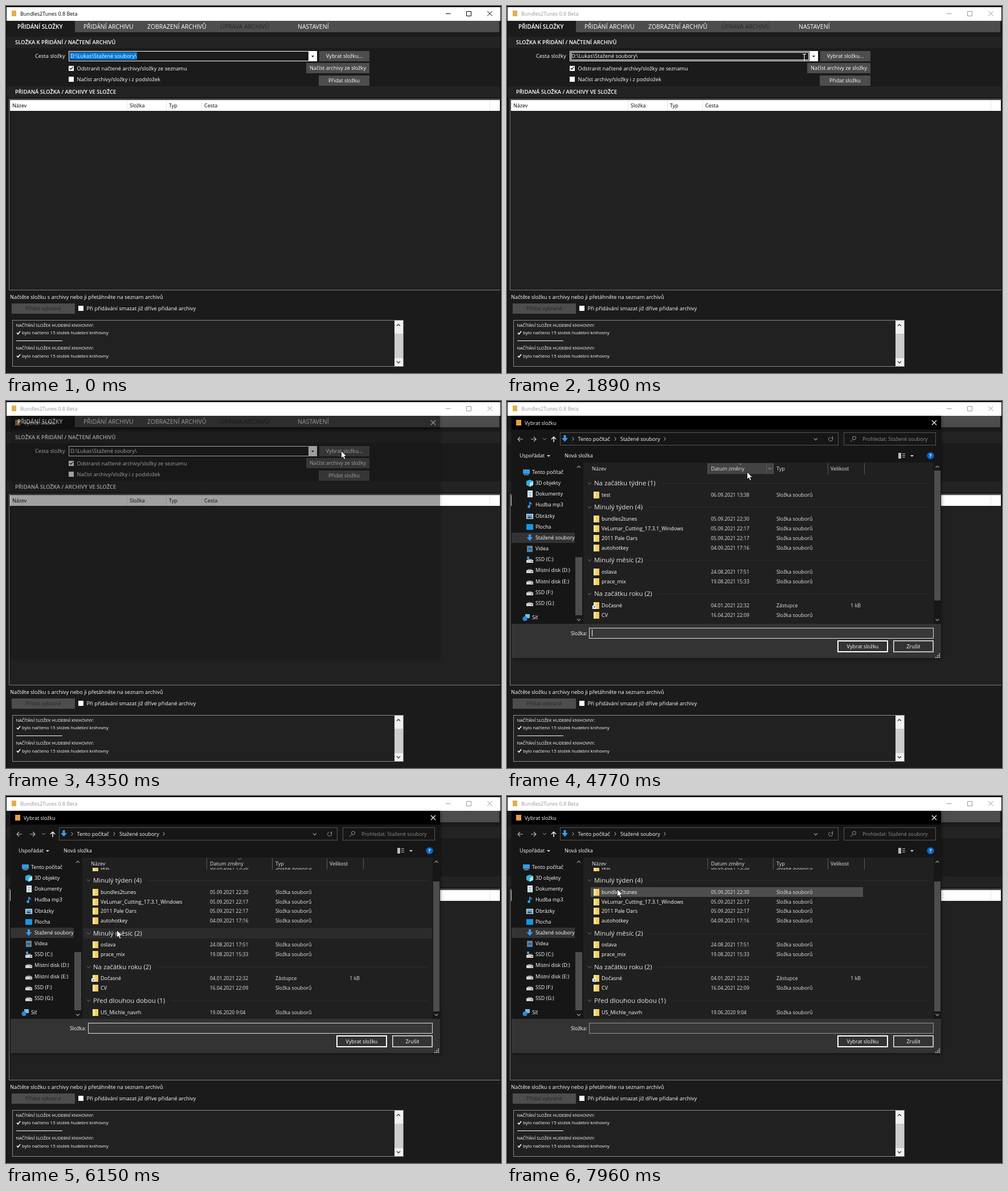
An HTML page for the animation above (8000 ms loop, 869 by 644 pixels).

```html
<!DOCTYPE html>
<html lang="cs">
<head>
<meta charset="utf-8">
<title>Bundles2Tunes</title>
<style>
html, body { margin: 0; width: 100%; height: 100%; overflow: hidden; background: #1b1b1b; }
svg { display: block; width: 869px; height: 644px; }
text { font-family: "Open Sans", "Noto Sans", sans-serif; white-space: pre; }
rect, line { shape-rendering: crispEdges; }
</style>
</head>
<body>
<svg id="stage" viewBox="0 0 869 644" xmlns="http://www.w3.org/2000/svg"></svg>
<script>
const NS = 'http://www.w3.org/2000/svg';
const LOOP = 8000, SCROLL = 38.5;
const stage = document.getElementById('stage');

function el(parent, tag, attrs) {
  const node = document.createElementNS(NS, tag);
  for (const k in attrs) node.setAttribute(k, attrs[k]);
  parent.appendChild(node);
  return node;
}
const group = (parent, attrs = {}) => el(parent, 'g', attrs);
// Boxes and frames are given by their edges.
const box = (p, x0, y0, x1, y1, fill) =>
  el(p, 'rect', { x: x0, y: y0, width: x1 - x0, height: y1 - y0, fill });
const frame = (p, x0, y0, x1, y1, stroke, fill = 'none') =>
  el(p, 'rect', { x: x0 + .5, y: y0 + .5, width: x1 - x0 - 1, height: y1 - y0 - 1, stroke, fill });
const path = (p, d, stroke, width = 1, fill = 'none') =>
  el(p, 'path', { d, stroke, 'stroke-width': width, fill });
// Text is placed by the middle of its capitals.
function label(p, str, x, y, size = 9, fill = '#fff', extra = {}) {
  const node = el(p, 'text', { x, y: y + size * .36, 'font-size': size, fill, ...extra });
  node.textContent = str;
  return node;
}
const chevron = (p, x, y, dx, dy, stroke, width = 1) =>
  path(p, dx ? `M${x - dx},${y - 3}L${x + dx},${y}L${x - dx},${y + 3}`
             : `M${x - 3},${y - dy}L${x},${y + dy}L${x + 3},${y - dy}`, stroke, width);
const triangle = (p, x, y, fill, r = 3) =>
  path(p, `M${x - r},${y - r / 2}h${2 * r}l${-r},${r}z`, 'none', 0, fill);
const show = (node, on) => node.setAttribute('display', on ? 'inline' : 'none');

/* ---------- main window ---------- */
const main = group(stage);
box(main, 0, 0, 869, 644, '#1b1b1b');
box(main, 0, 0, 869, 2, '#080808');
box(main, 0, 0, 1, 644, '#080808');
box(main, 868, 0, 869, 644, '#080808');
box(main, 1, 2, 868, 26, '#fff');
box(main, 10, 8, 18, 18, '#e2b04a');
const title = label(main, 'Bundles2Tunes 0.8 Beta', 25, 13.5, 9, '#000');
const controls = path(main, 'M772,13.5h8.5M808.5,9.5h8v8h-8zM845,9l8.5,8.5M853.5,9l-8.5,8.5', '#000');

box(main, 121, 26, 866, 46, '#4d4d4d');
label(main, 'PŘIDÁNÍ SLOŽKY', 20, 36.5, 10, '#fff', { 'font-weight': 600 });
[['PŘIDÁNÍ ARCHIVU', 136], ['ZOBRAZENÍ ARCHIVŮ', 248], ['ÚPRAVA ARCHIVŮ', 376, '#292929'], ['NASTAVENÍ', 512]]
  .forEach(([s, x, c]) => label(main, s, x, 36.5, 10.5, c || '#fff'));

function section(str, y0, y1) {
  box(main, 1, y0, 868, y1, '#232323');
  label(main, str, 16, (y0 + y1) / 2, 9.45, '#fff', { 'font-weight': 600 });
}
section('SLOŽKA K PŘIDÁNÍ / NAČTENÍ ARCHIVŮ', 54, 74);
section('PŘIDANÁ SLOŽKA / ARCHIVY VE SLOŽCE', 141, 160);

label(main, 'Cesta složky', 51, 88, 9.3);
frame(main, 110, 79, 546, 97, '#fff', '#1b1b1b');
box(main, 531, 79, 546, 97, '#fff');
triangle(main, 538.5, 88.5, '#000', 2.5);
const selection = box(main, 112, 81, 230, 94, '#0078d7');
const comboFocus = frame(main, 112, 81, 530, 95, '#fff');
label(main, 'D:\\Lukas\\Stažené soubory\\', 113, 87.5, 9.3);

function checkbox(str, x, y, on) {
  box(main, x, y - 5, x + 9, y + 4, '#fff');
  if (on) path(main, `M${x + 1.7},${y - .6}l2,2.3l3.8,-4.4`, '#000', 1.2);
  label(main, str, x + 14.5, y, 9.25);
}
checkbox('Odstranit načtené archivy/složky ze seznamu', 110, 109.5, true);
checkbox('Načíst archivy/složky i z podsložek', 110, 128.5);
checkbox('Při přidávání smazat již dříve přidané archivy', 127, 530.5);

const buttons = [
  ['Vybrat složku...', 550, 79, 638, 97],
  ['Načíst archivy ze složky', 527, 100, 638, 118],
  ['Přidat složku', 549, 122, 638, 140],
  ['Přidat vybrané', 10, 522, 121, 540, '#252525']
].map(([s, x0, y0, x1, y1, c]) => {
  const node = box(main, x0, y0, x1, y1, '#4d4d4d');
  label(main, s, (x0 + x1) / 2, (y0 + y1) / 2, 9.2, c || '#fff', { 'text-anchor': 'middle' });
  return { node, x0, y0, x1, y1, off: !!c };
});

frame(main, 5, 163, 868, 499, '#7c7c7c', '#212121');
box(main, 867, 164, 868, 498, '#212121');
box(main, 7, 165, 867, 184, '#fff');
[212, 281, 343, 849].forEach(x => box(main, x, 165, x + 1, 184, '#e3e3e3'));
[['Název', 11], ['Složka', 217], ['Typ', 286], ['Cesta', 348]]
  .forEach(([s, x]) => label(main, s, x, 174.5, 9, '#000'));
label(main, 'Načtěte složku s archivy nebo ji přetáhněte na seznam archivů', 7, 510.5, 9.3);

frame(main, 11, 551, 698, 633, '#8a8a8a', '#212121');
[560, 600.5].forEach(y => {
  label(main, 'NAČÍTÁNÍ SLOŽEK HUDEBNÍ KNIHOVNY:', 17.5, y, 7.4);
  path(main, `M19,${y + 13.5}l2,2.3l4,-5`, '#fff', 1.6);
  label(main, 'bylo načteno 15 složek hudební knihovny', 28, y + 13.5, 7.95);
});
box(main, 18, 587, 99, 588, '#fff');
box(main, 682, 552, 697, 632, '#f0f0f0');
box(main, 682, 575, 697, 618, '#cdcdcd');
chevron(main, 689, 560, 0, -1.6, '#444', 1.4);
chevron(main, 689, 625, 0, 1.6, '#444', 1.4);

/* ---------- folder dialog ---------- */
const defs = el(stage, 'defs', {});
const shadow = el(defs, 'filter', { id: 'shadow', x: '-5%', y: '-5%', width: '110%', height: '110%' });
el(shadow, 'feDropShadow', { dx: 1, dy: 2, stdDeviation: 3, 'flood-color': '#000', 'flood-opacity': .4 });
box(el(defs, 'clipPath', { id: 'listClip' }), 134, 126, 749, 390, '#fff');

const dialog = group(stage);
box(dialog, 8, 26, 762, 451, '#191919').setAttribute('filter', 'url(#shadow)');
box(dialog, 8, 26, 762, 50, '#000');
box(dialog, 16, 33, 25, 43, '#e2a04a');
label(dialog, 'Vybrat složku', 31, 38.5);
path(dialog, 'M746,34l8,8M754,34l-8,8', '#fff', 1.1);

const content = group(dialog);
const GREY = '#9a9a9a';
path(content, 'M28,67h-9m4,-4l-4,4l4,4', '#b5b5b5', 1.2);
path(content, 'M42,67h9m-4,-4l4,4l-4,4', '#b5b5b5', 1.2);
chevron(content, 66, 66.5, 0, 1.3, GREY);
path(content, 'M82,72v-9m-4,4l4,-4l4,4', '#fff', 1.4);
frame(content, 93, 55, 582, 78, '#555');
frame(content, 591, 55, 753, 78, '#555');
const downArrow = (x, y) => path(content, `M${x - 2},${y - 6}h4v5h3.5l-5.5,6.5l-5.5,-6.5h3.5z`, 'none', 0, '#3b9ae8');
downArrow(101.5, 66);
[116, 190, 277].forEach(x => chevron(content, x, 66.5, 1.3, 0, '#c8c8c8'));
label(content, 'Tento počítač', 124.5, 66.5, 9.1);
label(content, 'Stažené soubory', 199, 66.5, 9);
chevron(content, 542, 67, 0, 1.6, GREY, 1.2);
path(content, 'M571,64.5a3.6,3.6 0 1 1 -4,-1.2M571.5,62v3h-3', GREY);
path(content, 'M607,67.5l-4,4M606.5,65a3,3 0 1 1 6,0a3,3 0 1 1 -6,0', GREY);
label(content, 'Prohledat: Stažené soubory', 624, 66.5, 8.95, '#8c8c8c');

label(content, 'Uspořádat', 22, 96);
triangle(content, 73, 96.5, '#ddd');
label(content, 'Nová složka', 101, 96);
[91.5, 94.5, 97.5].forEach(y => box(content, 694, y, 699, y + 1, '#bbb'));
box(content, 687, 91, 692, 101, '#bbb');
triangle(content, 711, 96.5, '#ddd');
el(content, 'circle', { cx: 743.5, cy: 96, r: 6.2, fill: '#0b63c5' });
label(content, '?', 743.5, 96, 9, '#fff', { 'text-anchor': 'middle', 'font-weight': 700 });

/* navigation pane */
box(content, 8, 231, 119, 249, '#333');
const BLUE = '#2f9be6';
const icons = {
  pc: (x, y) => { box(content, x - 6, y - 5, x + 6, y + 3, BLUE); box(content, x - 4, y + 4, x + 4, y + 5, '#ccc'); },
  cube: (x, y) => { path(content, `M${x},${y - 6}l6,2.5v7l-6,3l-6,-3v-7z`, 'none', 0, '#35b0df');
                    path(content, `M${x},${y}l6,-3.5v7l-6,3z`, 'none', 0, '#aee3f5'); },
  doc: (x, y) => { box(content, x - 4, y - 6, x + 5, y + 6, '#eee');
                   [-3, 0, 3].forEach(d => box(content, x - 2, y + d, x + 3, y + d + 1, BLUE)); },
  note: (x, y) => { path(content, `M${x},${y + 3}v-8q1,3 4,4`, BLUE, 1.7);
                    el(content, 'circle', { cx: x - 1.5, cy: y + 3.5, r: 2.4, fill: BLUE }); },
  image: (x, y) => { box(content, x - 6, y - 4, x + 6, y + 5, '#e8eef2'); box(content, x - 5, y - 3, x + 5, y + 4, '#5aaad8');
                     path(content, `M${x - 5},${y + 4}l4,-4l6,4z`, 'none', 0, '#35546a'); },
  desk: (x, y) => box(content, x - 6, y - 5, x + 6, y + 5, '#1596e8'),
  down: (x, y) => downArrow(x, y),
  film: (x, y) => { box(content, x - 5, y - 5, x + 5, y + 6, '#777'); box(content, x - 3, y - 5, x + 3, y + 6, '#3f86c0');
                    box(content, x - 3, y, x + 3, y + 1, '#222'); },
  disk: (x, y) => { path(content, `M${x - 5},${y}l2,-2h6l2,2z`, 'none', 0, '#888');
                    el(content, 'rect', { x: x - 6, y, width: 12, height: 5, rx: 1, fill: '#d5d5d5' });
                    box(content, x + 2, y + 2, x + 5, y + 3, '#555'); },
  sys: (x, y) => { icons.disk(x, y + 1); box(content, x - 5, y - 5, x - 1, y - 1, BLUE); },
  net: (x, y) => { box(content, x - 2, y - 6, x + 6, y + 1, '#6cc0f0');
                   el(content, 'circle', { cx: x - 2, cy: y + 2, r: 4, fill: '#3a86cf' }); }
};
[['Tento počítač', 'pc', 125], ['3D objekty', 'cube', 144], ['Dokumenty', 'doc', 163], ['Hudba mp3', 'note', 182],
 ['Obrázky', 'image', 201.5], ['Plocha', 'desk', 220.5], ['Stažené soubory', 'down', 240], ['Videa', 'film', 259],
 ['SSD (C:)', 'sys', 278], ['Místní disk (D:)', 'disk', 297], ['Místní disk (E:)', 'disk', 316.5],
 ['SSD (F:)', 'disk', 335.5], ['SSD (G:)', 'disk', 354.5], ['Síť', 'net', 380]]
  .forEach(([s, icon, y]) => {
    const root = icon === 'pc' || icon === 'net';
    icons[icon](root ? 33.5 : 40, Math.round(y));
    label(content, s, root ? 44 : 50, y, 8.9);
  });

/* file list */
box(content, 134, 108, 749, 391, '#202020');
[[120, 132], [749, 762]].forEach(([a, b]) => {
  box(content, a, 108, b, 391, '#171717');
  chevron(content, (a + b) / 2, 115.5, 0, -1.5, GREY, 1.2);
  chevron(content, (a + b) / 2, 384, 0, 1.5, GREY, 1.2);
});
box(content, 120, 274, 132, 376, '#4d4d4d');
const thumb = box(content, 750, 122, 761, 350, '#4d4d4d');

const list = group(group(content, { 'clip-path': 'url(#listClip)' }));
const rows = [];
function heading(str, y, lineX) {
  rows.push({ y, half: 9, x0: 136, x1: 748, node: box(list, 136, y - 9, 748, y + 9, '#2b2b2b') });
  chevron(list, 145, y + .5, 0, 1.7, '#777');
  label(list, str, 153, y, 11.4, '#e8e8e8');
  box(list, lineX, y, 741, y + 1, '#2c2c2c');
}
function row(str, y, date, size) {
  rows.push({ y, half: 8.5, x0: 147, x1: 625, node: box(list, 147, y - 8.5, 625, y + 8.5, '#4d4d4d') });
  box(list, 152, y - 6, 162, y + 6, '#f2cf62');
  box(list, 152, y - 6, 156, y + 6, '#ffe392');
  if (size) {
    box(list, 150, y, 156, y + 6, '#fff');
    path(list, `M151.5,${y + 5}l3,-3m-2,0h2v2`, '#1b6fc0');
    label(list, size, 621, y, 8.8, '#e4e4e4', { 'text-anchor': 'end' });
  }
  label(list, str, 166, y);
  label(list, date, 358, y, 8.5, '#e4e4e4');
  label(list, size ? 'Zástupce' : 'Složka souborů', 473, y, 8.9, '#e4e4e4');
}
heading('Na začátku týdne (1)', 144, 272);
row('test', 164.5, '06.09.2021 13:38');
heading('Minulý týden (4)', 186, 249);
row('bundles2tunes', 207, '05.09.2021 22:30');
row('VeLumar_Cutting_17.3.1_Windows', 224, '05.09.2021 22:17');
row('2011 Pale Oars', 240.5, '05.09.2021 22:17');
row('autohotkey', 257.5, '04.09.2021 17:16');
heading('Minulý měsíc (2)', 279, 249);
row('oslava', 299.5, '24.08.2021 17:51');
row('prace_mix', 316.5, '19.08.2021 15:33');
heading('Na začátku roku (2)', 338, 265);
row('Dočasné', 358.5, '04.01.2021 22:32', '1 kB');
row('CV', 375.5, '16.04.2021 22:09');
heading('Před dlouhou dobou (1)', 397, 290);
row('US_Michle_navrh', 418, '19.06.2020 9:04');

const dateHover = group(content);
box(dateHover, 352, 109, 468, 128, '#434343');
box(dateHover, 455, 109, 456, 128, '#5a5a5a');
chevron(dateHover, 461.5, 118.5, 0, 1.3, '#bbb');
[352, 467, 563, 627].forEach(x => box(content, x, 109, x + 1, 129, '#5c5c5c'));
chevron(content, 410, 110.5, 0, 1.2, '#888');
[['Název', 149], ['Datum změny', 358], ['Typ', 473], ['Velikost', 568]]
  .forEach(([s, x]) => label(content, s, x, 119, 9, '#e4e4e4'));

/* bottom panel */
box(content, 8, 391, 762, 451, '#333');
label(content, 'Složka:', 112, 407.5, 8.9);
const input = frame(content, 144, 398, 749, 417, '#e0e0e0', '#383838');
const caret = box(content, 149, 401, 150, 413, '#fff');
frame(content, 580, 420, 669, 441, '#fff');
frame(content, 581, 421, 668, 440, '#fff');
frame(content, 678, 420, 749, 441, '#e0e0e0');
frame(content, 679, 421, 748, 440, '#999');
label(content, 'Vybrat složku', 624.5, 430.5, 9, '#fff', { 'text-anchor': 'middle' });
label(content, 'Zrušit', 713.5, 430.5, 9, '#fff', { 'text-anchor': 'middle' });
for (let i = 0; i < 3; i++)
  for (let j = 0; j <= i; j++) box(content, 758 - 3 * j, 443 + 3 * i, 760 - 3 * j, 445 + 3 * i, '#aaa');

/* ---------- pointer ---------- */
const pointer = group(stage);
const arrow = path(pointer, 'M.5,.5v13l3,-2.8l2,4.8l2.4,-1l-2,-4.6h4.1z', '#000', .8, '#fff');
const beam = path(pointer, 'M-3,-5.5h2.5l.5,.7l.5,-.7h2.5M0,-5v11M-3,6.5h2.5l.5,-.7l.5,.7h2.5', '#fff', 1.1);

// time, x, y
const TRACK = [
  [1180, 500, 1], [1320, 545, 40], [1460, 580, 86], [1600, 585, 102], [1750, 560, 103], [1890, 522, 90],
  [1960, 490, 100], [2100, 444, 106], [2300, 475, 115], [2500, 550, 120], [2720, 583, 125], [2920, 580, 124],
  [3060, 573, 114], [3260, 573, 113], [3520, 573, 110], [3730, 586, 90], [3870, 590, 86], [4350, 588, 87],
  [4560, 510, 108], [4770, 421, 124], [4980, 405, 127], [5130, 330, 150], [5340, 184, 215], [5620, 190, 222],
  [6080, 190, 222], [6300, 203, 262], [6500, 216, 285], [6700, 215, 245], [6840, 214, 217], [6910, 213, 206],
  [7050, 209, 190], [7250, 197, 172], [7400, 192, 166], [7670, 192, 166], [7760, 192, 157], [7880, 193, 163], [8000, 193, 163]
];
// The screen is sampled every 70 ms, so the pointer moves in steps.
function pointerAt(t) {
  let i = 0;
  while (i < TRACK.length - 2 && TRACK[i + 1][0] <= t) i++;
  const [t0, x0, y0] = TRACK[i], [t1, x1, y1] = TRACK[i + 1];
  const p = Math.min(1, Math.max(0, Math.floor((t - t0) / 70) * 70 / (t1 - t0)));
  return [x0 + (x1 - x0) * p, y0 + (y1 - y0) * p];
}
const inside = (x, y, x0, y0, x1, y1) => x >= x0 && x < x1 && y >= y0 && y < y1;

function render(t) {
  const [x, y] = pointerAt(t);
  const seen = t >= 1180, open = t >= 4350;
  const active = t < 260 || (t >= 4070 && t < 4280);
  title.setAttribute('fill', active ? '#000' : '#999');
  controls.setAttribute('stroke', active ? '#000' : '#999');
  show(selection, t < 260);

  const onMain = seen && !open;
  const onCombo = onMain && inside(x, y, 110, 79, 531, 97);
  show(comboFocus, onCombo);
  for (const b of buttons) {
    const hot = onMain && !b.off && inside(x, y, b.x0, b.y0, b.x1, b.y1);
    b.node.setAttribute('fill', hot ? '#6b6b6b' : '#4d4d4d');
  }

  show(dialog, open);
  dialog.setAttribute('opacity', Math.min(1, .4 + (t - 4350) / 230));
  show(content, t >= 4490);
  const offset = t >= 5480 ? SCROLL : 0;
  list.setAttribute('transform', `translate(0 ${-offset})`);
  thumb.setAttribute('y', offset ? 149.5 : 122);
  show(dateHover, inside(x, y, 352, 108, 468, 129));
  for (const r of rows) {
    const mid = r.y - offset;
    show(r.node, y >= 129 && inside(x, y, r.x0, mid - r.half, r.x1, mid + r.half));
  }
  const focused = t < 7880;
  input.setAttribute('stroke', focused ? '#e0e0e0' : '#959595');
  show(caret, focused && t >= 4570 && (t - 4570) % 1050 < 525);

  show(pointer, seen);
  pointer.setAttribute('transform', `translate(${Math.round(x)} ${Math.round(y)})`);
  show(arrow, !onCombo);
  show(beam, onCombo);
}

const start = performance.now();
function tick() {
  render((performance.now() - start) % LOOP);
  requestAnimationFrame(tick);
}
tick();
</script>
</body>
</html>
```
